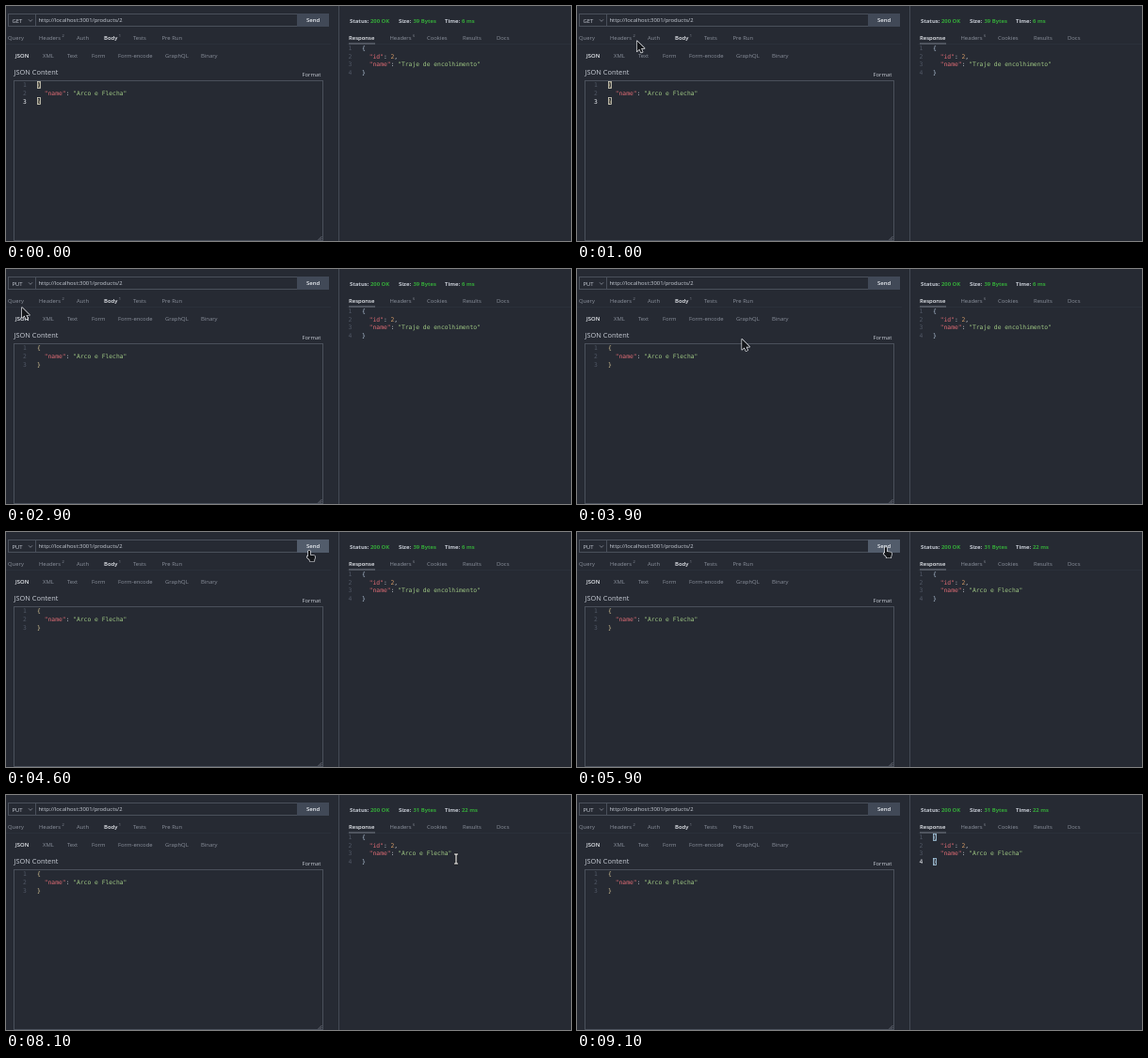
Recreate the animation shown at these times as an HTML page with a canvas. Size 600 by 250 pixels, loop 9700 ms.

```html
<!DOCTYPE html>
<html lang="pt">
<head>
<meta charset="utf-8">
<title>PUT /products/2</title>
<style>
  html, body { margin: 0; width: 100%; height: 100%; overflow: hidden; background: #262a32; }
  canvas { display: block; width: 600px; height: 250px; }
</style>
</head>
<body>
<canvas id="stage" width="600" height="250"></canvas>
<script>
const ctx = document.getElementById('stage').getContext('2d');
const LOOP = 9700, STEP = 100;
const OPEN = 1500, CLOSE = 2900, REPLY = 5800, FOCUS_REPLY = 8500;
const SANS = '"Open Sans", "Noto Sans", sans-serif';
const MONO = '"DejaVu Sans Mono", monospace';
const C = {
  bg: '#262a33', line: '#4a505b', faint: '#303540',
  text: '#c9ced7', dim: '#8b919c', white: '#eceff4', green: '#35a83a',
  key: '#e06c75', string: '#9fc884', number: '#d19a66', gutter: '#515866'
};
const METHODS = ['GET', 'POST', 'PUT', 'DELETE', 'PATCH', 'HEAD', 'OPTIONS', 'PROPFIND', 'CUSTOM'];

// time, x, y of the pointer tip
const PATH = [
  [300, 200, 170], [1200, 44, 18], [1400, 24, 14], [1700, 24, 14], [1900, 19.5, 26], [2300, 17, 41],
  [3300, 17, 41], [3800, 160, 80], [4300, 306, 30], [4600, 321, 19.5], [5000, 323, 17],
  [5200, 323, 17], [5300, 327, 16], [6700, 327, 16], [7400, 407, 63], [7500, 407, 63],
  [8100, 478, 68], [8300, 478, 68], [8700, 482, 78], [8800, 482, 78], [9100, 529, 22]
];
const ARROW = new Path2D('M0 0V11L2.6 8.6 4.3 12.4 6 11.6 4.4 7.9H8Z');
const HAND = new Path2D('M0 .8Q1-.6 2 .8V5L6.2 5.6Q7.4 6 7.2 7.4L6.4 10.2V11.4H1.6V10.2L-1.4 7.2Q-1.4 5.8 0 6.4Z');
const BEAM = new Path2D('M-2-5H-.5L0-4.5 .5-5H2M0-4.5V4.5M-2 5H-.5L0 4.5 .5 5H2');

function text(str, x, y, color = C.dim, size = 5.9, weight = 400, family = SANS) {
  ctx.font = `${weight} ${size}px ${family}`;
  ctx.fillStyle = color;
  ctx.fillText(str, x, y + size * 0.36);
}

function rect(x, y, w, h, color) {
  ctx.fillStyle = color;
  ctx.fillRect(x, y, w, h);
}

function frame(x, y, w, h, color, width = 1) {
  ctx.strokeStyle = color;
  ctx.lineWidth = width;
  ctx.strokeRect(x, y, w, h);
}

function tabs(items, y, active) {
  for (const [name, x] of items) {
    const on = name === active;
    text(name, x, y, on ? C.white : C.dim, 5.9, on ? 600 : 400);
  }
}

// Draws runs of [text, color] in the code font.
function code(x, y, ...runs) {
  for (const [str, color] of runs) {
    text(str, x, y, color, 6.33, 400, MONO);
    x += ctx.measureText(str).width;
  }
}

function editor(x, y, gutterX, entries, focused, brace, box) {
  const row = 8.65, last = entries.length + 1, indent = x + 7.7;
  for (let i = 0; i <= last; i++) {
    code(gutterX, y + i * row, [String(i + 1), focused && i === last ? C.white : C.gutter]);
  }
  for (const [i, ch] of [[0, '{'], [last, '}']]) {
    code(x, y + i * row, [ch, brace]);
    if (focused) frame(x + 0.5, Math.round(y + i * row) - 3.5, 3, 7, box, 0.8);
  }
  entries.forEach(([key, value], i) => {
    const color = typeof value === 'number' ? C.number : C.string;
    code(indent, y + (i + 1) * row,
      [`"${key}"`, C.key], [': ', C.text], [JSON.stringify(value), color],
      [i < entries.length - 1 ? ',' : '', C.text]);
  });
}

function pointerAt(t) {
  if (t < PATH[0][0] || t >= PATH[PATH.length - 1][0]) return null;
  const i = PATH.findIndex(p => p[0] > t);
  const [t0, x0, y0] = PATH[i - 1], [t1, x1, y1] = PATH[i];
  const u = (t - t0) / (t1 - t0), e = u * u * (3 - 2 * u);
  return { x: x0 + (x1 - x0) * e, y: y0 + (y1 - y0) * e };
}

const inside = (p, x, y, w, h) => p && p.x >= x && p.x <= x + w && p.y >= y && p.y <= y + h;

function request(t, p) {
  const open = t >= OPEN && t < CLOSE;
  frame(31.5, 8.5, 278, 13, C.line);
  frame(2.5, 8.5, 29, 13, open ? '#a0a6b0' : C.line);
  text(t < CLOSE ? 'GET' : 'PUT', 6.5, 15.5, C.text);
  ctx.strokeStyle = C.dim;
  ctx.lineWidth = 0.8;
  ctx.stroke(new Path2D('M24 14.3L26 16.4 28 14.3'));
  text('http://localhost:3001/products/2', 34.5, 15, C.text);

  rect(309, 8, 34, 14, inside(p, 309, 8, 34, 14.5) ? '#525c6b' : '#414957');
  text('Send', 319, 15.2, C.white, 6, 600);

  tabs([['Query', 2], ['Headers', 35], ['Auth', 75], ['Body', 104], ['Tests', 135], ['Pre Run', 165.5]], 33.8, 'Body');
  text('2', 59.5, 31.8, C.dim, 4);
  text('1', 119.8, 31.8, C.dim, 4);
  rect(0, 40, 345, 0.6, C.faint);
  tabs([['JSON', 10], ['XML', 39], ['Text', 65], ['Form', 91], ['Form-encode', 119], ['GraphQL', 169], ['Binary', 207]], 52.8, 'JSON');
  text('JSON Content', 8.5, 70.2, C.text, 7.4);
  text('Format', 314.5, 72.4, C.text);

  frame(8.5, 79.5, 328, 170, C.line);
  ctx.strokeStyle = C.dim;
  ctx.lineWidth = 0.6;
  ctx.stroke(new Path2D('M331.5 249L335.5 245M333.5 249L335.5 247'));
  editor(33, 84, 18, [['name', 'Arco e Flecha']], t < OPEN, '#d8c796', '#d8d4c0');
  if (open) methodList(p);
}

function methodList(p) {
  const top = 26.9, row = 7.6;
  const hovered = Math.max(0, Math.round((p.y - top) / row));
  rect(1.5, 22, 35, 71.5, C.bg);
  frame(2, 22.5, 34, 71, '#9da2aa', 0.8);
  rect(2, 93, 34.4, 0.9, '#d5d8dc');
  rect(2.4, top - row / 2 + hovered * row, 33.4, row, '#1e90ee');
  METHODS.forEach((m, i) => text(m, 6.5, top + i * row, i === hovered ? C.white : C.text, 5.8));
}

function response(t) {
  const done = t >= REPLY;
  const facts = [
    [365, 'Status:', 387, '200 OK'],
    [417, 'Size:', 432.5, done ? '31 Bytes' : '39 Bytes'],
    [466, 'Time:', 484, done ? '22 ms' : '6 ms']
  ];
  rect(353, 0, 1, 250, '#444a55');
  for (const [x, label, vx, value] of facts) {
    text(label, x, 15.4, C.text, 5.9, 700);
    text(value, vx, 15.4, C.green, 5.9, 700);
  }
  tabs([['Response', 364], ['Headers', 407.5], ['Cookies', 447], ['Results', 485], ['Docs', 521]], 33.5, 'Response');
  text('6', 432, 31.5, C.dim, 4);
  rect(362, 40, 238, 0.6, C.faint);
  rect(364, 39.6, 28, 0.8, C.dim);
  editor(378, 44.7, 363.5, [['id', 2], ['name', done ? 'Arco e Flecha' : 'Traje de encolhimento']],
    t >= FOCUS_REPLY, '#b6c9dc', '#a9cce4');
}

function outlined(shape, fill) {
  ctx.lineJoin = 'round';
  ctx.strokeStyle = '#e4e6ea';
  ctx.lineWidth = 1.4;
  ctx.stroke(shape);
  ctx.fillStyle = fill;
  ctx.fill(shape);
}

function pointer(p, t) {
  if (!p) return;
  const menu = t >= OPEN && t < CLOSE;
  const typing = !menu && (inside(p, 9, 80, 327, 170) || inside(p, 354, 41, 246, 209) || inside(p, 32, 9, 276, 13));
  ctx.save();
  ctx.translate(p.x, p.y);
  if (typing) {
    ctx.strokeStyle = '#111';
    ctx.lineWidth = 2.4;
    ctx.stroke(BEAM);
    ctx.strokeStyle = '#fff';
    ctx.lineWidth = 1.1;
    ctx.stroke(BEAM);
  } else {
    outlined(inside(p, 309, 8, 34, 14.5) ? HAND : ARROW, '#14161a');
  }
  ctx.restore();
}

function draw(now) {
  const t = Math.floor((now % LOOP) / STEP) * STEP;
  const p = pointerAt(t);
  rect(0, 0, 600, 250, C.bg);
  request(t, p);
  response(t);
  pointer(p, t);
}

const start = performance.now();
function tick() {
  draw(performance.now() - start);
  requestAnimationFrame(tick);
}
tick();
</script>
</body>
</html>
```
